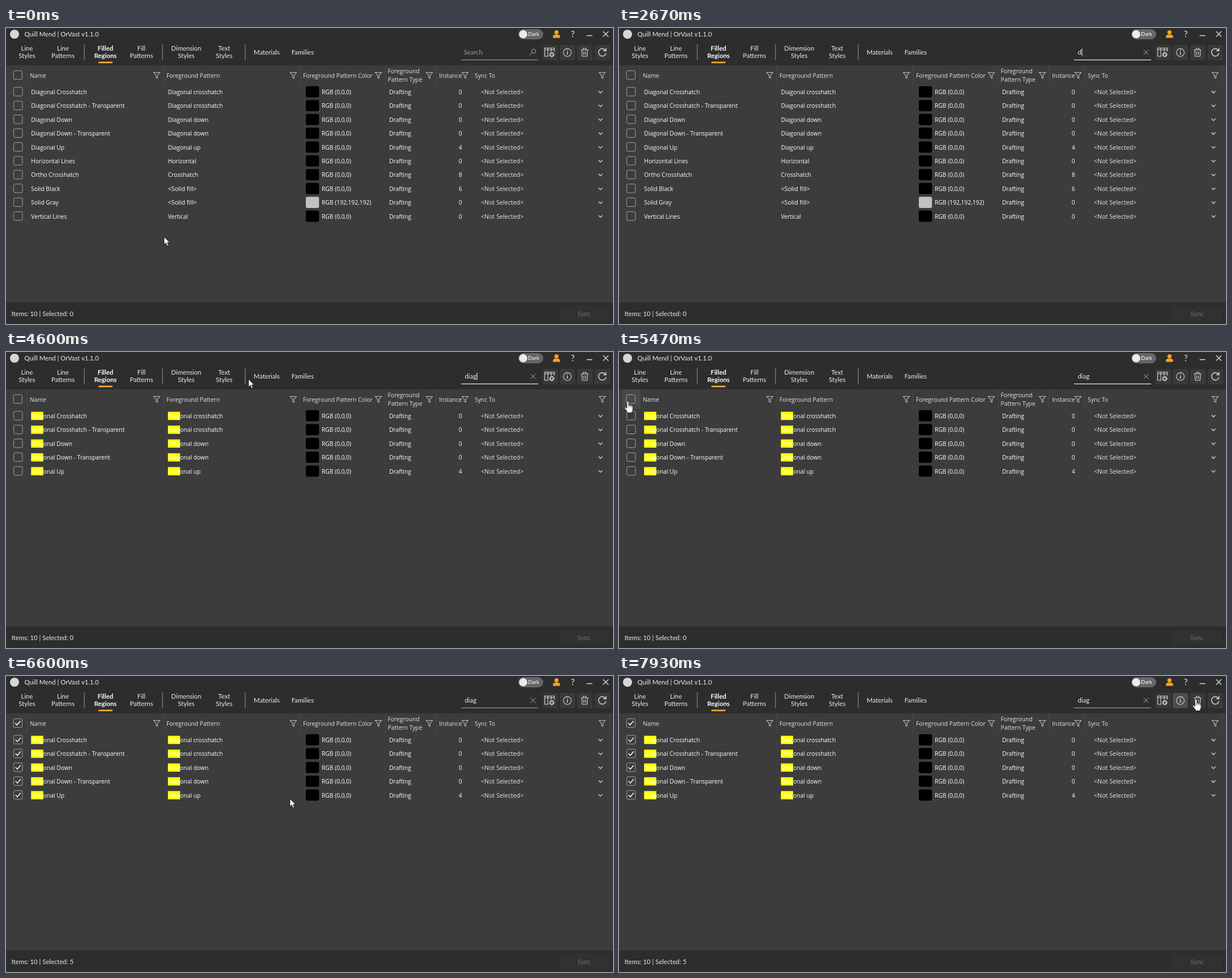
An HTML page that plays this animation: 1071 px wide and 523 px high, repeating every 8000 ms.

```html
<!DOCTYPE html>
<html lang="en">
<head>
<meta charset="utf-8">
<title>Style manager</title>
<style>
  html, body { margin: 0; width: 100%; height: 100%; overflow: hidden; background: #3c3c3c; }
  svg { display: block; width: 100vw; height: 100vh; }
  text { white-space: pre; }
  .ui { font: 11.3px Lato, sans-serif; fill: #ececec; }
  .grid { font: 10.3px "Open Sans", sans-serif; fill: #fff; }
  .head { fill: #e4e4e4; }
  .bracket { font-size: 10.7px; }
  .mid { text-anchor: middle; }
  .line { fill: none; stroke: #d8d8d8; stroke-width: 1.1; }
  .dim { stroke: #a8a8a8; stroke-width: 1; }
  .box { fill: none; stroke: #a2a2a2; stroke-width: 1; }
  .tick { fill: none; stroke: #fff; stroke-width: 1.5; }
  .pointer { fill: #fff; stroke: #111; stroke-width: .8; stroke-linejoin: round; }
</style>
</head>
<body>
<svg id="stage" viewBox="0 0 1071 523" preserveAspectRatio="none"></svg>
<script>
const LOOP = 8000, FPS = 15;
const stage = document.getElementById('stage');

const text = (x, y, str, cls = 'ui', extra = '') =>
  `<text x="${x}" y="${y}" class="${cls}" ${extra}>${str.replace(/</g, '&lt;')}</text>`;
const rect = (x, y, w, h, fill, extra = '') =>
  `<rect x="${x}" y="${y}" width="${w}" height="${h}" fill="${fill}" ${extra}/>`;
const circle = (x, y, r, extra = 'class="line"') => `<circle cx="${x}" cy="${y}" r="${r}" ${extra}/>`;
const path = (d, cls = 'line', extra = '') => `<path d="${d}" class="${cls}" ${extra}/>`;
const group = (id, body) => `<g id="${id}">${body}</g>`;

const rows = [
  ['Diagonal Crosshatch', 'Diagonal crosshatch', 0],
  ['Diagonal Crosshatch - Transparent', 'Diagonal crosshatch', 0],
  ['Diagonal Down', 'Diagonal down', 0],
  ['Diagonal Down - Transparent', 'Diagonal down', 0],
  ['Diagonal Up', 'Diagonal up', 4],
  ['Horizontal Lines', 'Horizontal', 0],
  ['Ortho Crosshatch', 'Crosshatch', 8],
  ['Solid Black', '<Solid fill>', 6],
  ['Solid Gray', '<Solid fill>', 0],
  ['Vertical Lines', 'Vertical', 0]
];
const MATCHES = 5;
const rowY = i => 112.8 + i * 24.42;

function titleBar() {
  return rect(0, 0, 1071, 66, '#2d2d2d') +
    circle(15, 11, 8, 'fill="#d6d6d6"') +
    text(32.5, 14.5, 'Quill Mend | OrVast v1.1.0') +
    rect(904, 2, 44, 18, '#666', 'rx="9"') +
    circle(912.5, 11, 7.2, 'fill="#ececec"') +
    text(921, 14, 'Dark', 'ui', 'style="font-size:9.3px;fill:#fff"') +
    circle(971.3, 7.6, 3.7, 'fill="#f9a11b"') +
    path('M965 17.5v-2q0-3.5 4-4h4.6q4 .5 4 4v2z', '', 'fill="#f9a11b"') +
    text(1000, 16, '?', 'ui mid', 'style="font-size:15px"') +
    path('M1024.5 13.5h10M1053.5 6l9.5 9.5m0-9.5l-9.5 9.5', 'line', 'style="stroke-width:1.4"');
}

function tabs() {
  const items = [[37, 'Line', 'Styles'], [100.5, 'Line', 'Patterns'], [175.5, 'Filled', 'Regions'],
    [239, 'Fill', 'Patterns'], [318, 'Dimension', 'Styles'], [385, 'Text', 'Styles'],
    [460, 'Materials'], [523.5, 'Families']];
  return items.map(([x, a, b]) => {
    const bold = a === 'Filled' ? 'style="font-weight:700;fill:#fff"' : '';
    return b ? text(x, 40, a, 'ui mid', bold) + text(x, 52.5, b, 'ui mid', bold) : text(x, 47, a, 'ui mid');
  }).join('') +
    [138, 276, 422].map(x => rect(x - .5, 29, 1.2, 28, '#858585')).join('') +
    rect(163, 59.5, 25, 2.8, '#f9ab30', 'rx="1"');
}

function searchAndTools() {
  const buttons = [947, 977, 1008, 1039].map((x, i) =>
    rect(x, 30, 27, 27, '#393939', `rx="2" ${i === 1 ? 'id="info"' : ''}`)).join('');
  return rect(803, 55.8, 136, 1.2, '#999', 'id="underline"') +
    text(807.5, 47, 'Search', 'ui', 'id="hint" style="fill:#989898"') +
    group('lens', circle(931, 41, 3.7, 'class="line dim"') + path('M928.2 43.8l-4.7 4.7', 'line dim')) +
    group('clear', path('M925.5 38.5l9 9m0-9l-9 9', 'line dim')) +
    text(809.5, 47, '', 'ui', 'id="query"') +
    rect(0, 36.5, 1, 13, '#fff', 'id="caret"') + buttons +
    path('M957 50h-6.5v-14.5h17v6M950.5 38.5h17M956 36v14M962 36v6') +
    circle(963, 47, 3.4, 'class="line" stroke-dasharray="1.8 .87" style="stroke-width:2.2"') +
    circle(963, 47, 2.5) +
    circle(990.5, 43.3, 6.9) +
    path('M990.5 42v5M990.5 39v1.6', 'line', 'style="stroke-width:1.5"') +
    path('M1014.5 38.5h13M1018.5 38v-2h5v2M1016 39l.7 11h8.6l.7-11M1019.5 41.5v6M1022.5 41.5v6') +
    path('M1058 40a6.6 6.6 0 1 0 .6 4.5M1058.6 35.5v4.8h-4.8', 'line', 'style="stroke-width:1.4"');
}

function tableHead() {
  const label = (x, str, y = 87.5) => text(x, y, str, 'grid head');
  const funnel = x => path(`M${x - 5.5} 78.5h11l-4.2 5v5.5l-2.6-1.7v-3.8z`, 'line', 'style="stroke:#bcbcbc"');
  return rect(6, 66, 32, 34, '#494949', 'id="headCheck"') +
    rect(759, 66, 63, 34, '#494949', 'id="headInstance"') +
    [37, 278, 519, 669, 759, 822, 1065].map(x => rect(x - .5, 66, 1, 34, '#4a4a4a')).join('') +
    label(42, 'Name') + label(283, 'Foreground Pattern') + label(524, 'Foreground Pattern Color') +
    label(673.5, 'Foreground', 80) + label(673.5, 'Pattern Type', 94.5) +
    label(764, 'Instance') + label(827, 'Sync To') +
    [266, 507, 657, 747, 810, 1052].map(funnel).join('') +
    rect(13.2, 75.5, 15.3, 15.3, 'none', 'rx="2" class="box"');
}

function tableRow([name, pattern, count], i) {
  const y = rowY(i), base = y + 4.1, gray = name === 'Solid Gray';
  const cell = (x, str, cls = '') =>
    text(x, base, str, `grid ${cls} ${str[0] === '<' ? 'bracket' : ''}`);
  return rect(13.7, y - 8, 15.3, 15.3, 'none', 'rx="2" class="box"') +
    cell(44.3, name, 'find') + cell(285.7, pattern, 'find') +
    rect(529, y - 10, 23.3, 19.8, gray ? '#c0c0c0' : '#000', 'rx="3"') +
    cell(557, gray ? 'RGB (192,192,192)' : 'RGB (0,0,0)') +
    cell(676, 'Drafting', 'find') + cell(801.8, String(count), 'mid') +
    cell(838, '<Not Selected>', 'head') +
    path(`M1045.5 ${y - 1.5}l3.4 3.4l3.4-3.4`, 'line', 'style="stroke-width:1.7;stroke:#b8b8b8"');
}

const tick = (x, y) => path(`M${x - 4.5} ${y}l3.2 3.4l5.8-7`, 'tick');

function pointers() {
  return group('arrow', path('M0 0V13.6L3.1 10.8L5.3 16L7.7 15L5.5 10H9.7Z', 'pointer')) +
    group('beam', path('M-3 0h2.2l.8.8l.8-.8H3M-3 14h2.2l.8-.8l.8.8H3M0 1v12', 'line', 'style="stroke:#eee"')) +
    group('hand', path('M-1.6 1.6Q-1.5 0 0 0Q1.6 0 1.6 1.6V7Q2.8 5.8 4.4 7.3Q6 6.3 7 8Q9 7.5 9 9.8V14Q9 17 7.2 18.2V20.5H-1V18.5L-5.5 12.5Q-6.5 10.5-4.5 10.3L-1.6 12.5Z', 'pointer') +
      path('M1.6 7v3.5M4.4 7.5v3M7 8.5v2.5', 'line', 'style="stroke:#111;stroke-width:.8"'));
}

stage.innerHTML = rect(0, 0, 1071, 523, '#3c3c3c') + titleBar() + tabs() + searchAndTools() + tableHead() +
  group('marks', '') +
  group('kept', rows.slice(0, MATCHES).map(tableRow).join('')) +
  group('dropped', rows.slice(MATCHES).map((r, i) => tableRow(r, i + MATCHES)).join('')) +
  group('ticks', tick(20.8, 83.2) + rows.slice(0, MATCHES).map((_, i) => tick(21.3, rowY(i) - .3)).join('')) +
  rect(0, 485, 1071, 38, '#2d2d2d') + text(9.7, 509, '', 'ui', 'id="status"') +
  rect(976, 491, 89, 27, '#313131') +
  text(1020, 509, 'Sync', 'ui mid', 'style="fill:#707070"') + pointers();

const $ = id => document.getElementById(id);
const show = (id, on) => { $(id).style.display = on ? '' : 'none'; };
const within = (t, ...spans) => spans.some(([a, b]) => t >= a && t < b);

// [ms, x, y] of the pointer's hot spot
const route = [[0, 279, 369], [70, 279, 369], [330, 345, 338], [870, 678, 198], [1000, 782, 108],
  [1130, 885, 66], [1200, 895, 58], [1400, 865, 43], [4200, 650, 295], [4400, 582, 214],
  [4600, 428, 48], [4800, 300, 47], [5100, 130, 70], [5400, 30, 87], [5466, 15.5, 87],
  [5800, 15.5, 87], [6000, 70, 103], [6270, 210, 139], [6600, 501, 217], [6870, 760, 248],
  [7130, 960, 248], [7400, 972, 140], [7670, 985, 60], [7866, 1018, 41], [LOOP, 1018, 41]];
const typed = [[0, ''], [2470, 'd'], [2930, 'dia'], [3400, 'diag']];
const found = [[0, ''], [2930, 'd'], [3200, 'dia'], [3670, 'diag']];

const latest = (track, t) => track.filter(([at]) => at <= t).pop()[1];

function pointerAt(t) {
  const i = Math.max(1, route.findIndex(([at]) => at >= t));
  const [t0, x0, y0] = route[i - 1], [t1, x1, y1] = route[i];
  const k = (t - t0) / (t1 - t0);
  return [x0 + (x1 - x0) * k, y0 + (y1 - y0) * k];
}

let marked = null;
function highlight(word) {
  if (word === marked) return;
  marked = word;
  let out = '';
  if (word) for (const el of stage.querySelectorAll('.find')) {
    // Hidden rows have no glyph positions to measure.
    if (el.closest('#dropped')?.style.display === 'none') continue;
    const str = el.textContent.toLowerCase();
    for (let i = str.indexOf(word); i >= 0; i = str.indexOf(word, i + 1)) {
      out += rect(el.getStartPositionOfChar(i).x, el.getAttribute('y') - 11.3,
        el.getSubStringLength(i, word.length), 14.6, '#ff0');
    }
  }
  $('marks').innerHTML = out;
}

function drawPointer(t) {
  const [x, y] = pointerAt(t);
  const visible = !within(t, [2460, 4195]);
  const inField = x > 803 && x < 940 && y < 57;
  const onControl = (x < 28 && y < 95) || (x > 977 && y < 57);
  const kind = inField ? 'beam' : onControl ? 'hand' : 'arrow';
  for (const id of ['arrow', 'beam', 'hand']) show(id, visible && id === kind);
  $(kind).setAttribute('transform', `translate(${x.toFixed(1)} ${y.toFixed(1)})`);
}

function render(ms) {
  // Everything advances in whole steps of 1/15 s.
  const t = Math.floor((ms + 5) * FPS / 1000) * 1000 / FPS + 5;
  const word = latest(typed, t), checked = t >= 5670;
  const query = $('query');
  query.textContent = word;
  $('caret').setAttribute('x', word ? 810 + query.getComputedTextLength() : 808.5);
  show('caret', within(t, [1600, 2270], [2470, 3930], [4400, 4930]));
  $('underline').setAttribute('fill', within(t, [1600, 5670]) ? '#f0f0f0' : '#999');
  show('hint', !word);
  show('lens', !word);
  show('clear', word);
  show('dropped', t < 3200);
  highlight(latest(found, t));
  show('ticks', checked);
  $('status').textContent = `Items: 10 | Selected: ${checked ? 5 : 0}`;
  show('headInstance', within(t, [1060, 1200]));
  show('headCheck', within(t, [5460, 5930]));
  $('info').setAttribute('fill', t >= 7730 ? '#4c4c4c' : '#393939');
  drawPointer(t - 5);
}

const start = performance.now();
function play() {
  render((performance.now() - start) % LOOP);
  requestAnimationFrame(play);
}
play();
</script>
</body>
</html>
```
